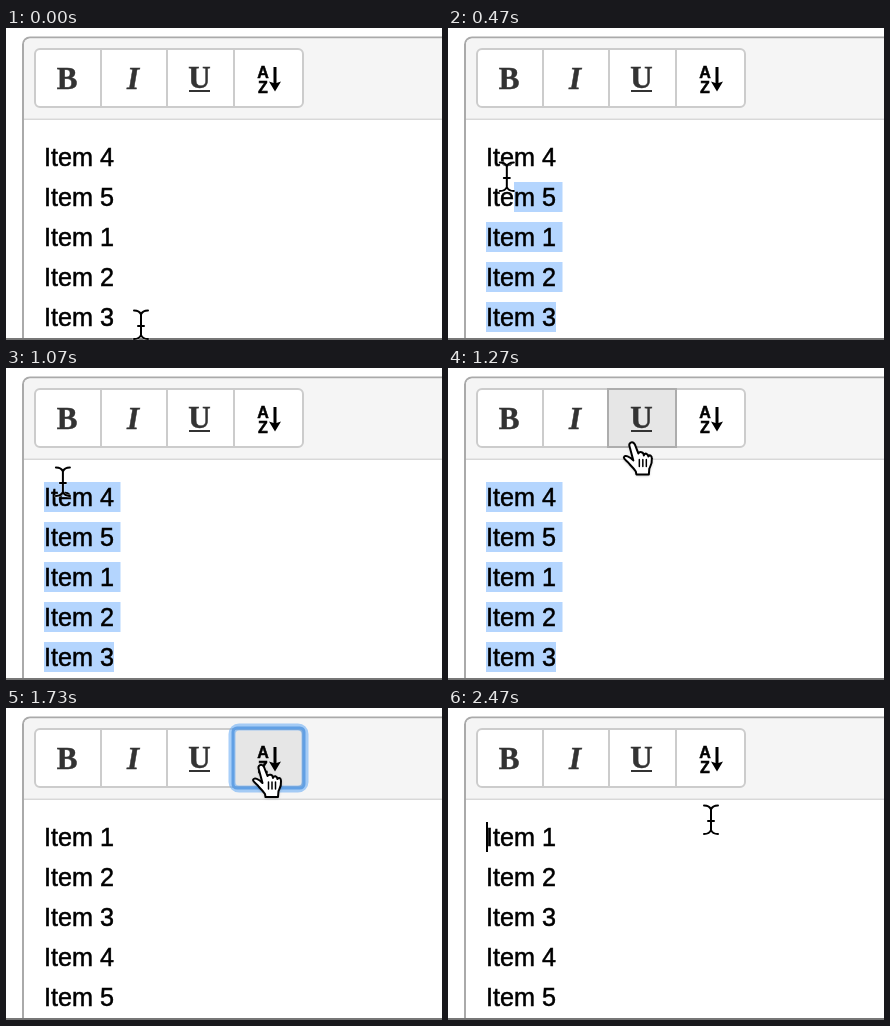
Recreate the animation shown at these times as an HTML page with a canvas. Size 436 px wide and 312 px high, loop 2590 ms.

```html
<!DOCTYPE html>
<html lang="en">
<head>
<meta charset="utf-8">
<style>
html, body { margin: 0; width: 100%; height: 100%; overflow: hidden; background: #fff; }
canvas { display: block; }
</style>
</head>
<body>
<canvas width="436" height="312"></canvas>
<script>
const c = document.querySelector("canvas").getContext("2d");
const LOOP = 2590, STEP = 200 / 3, LEFT = 38, END = 108, TAIL = 114.5;
const CLICK = 1600, SORT = 1730, BLUR = 2465;
const itemFont = '25.2px "Liberation Sans", Arial, sans-serif';
const serif = '31px "Liberation Serif", serif';
const sans = 'bold 16px "Liberation Sans", Arial, sans-serif';
const unsorted = [4, 5, 1, 2, 3], sorted = [...unsorted].sort();
const edges = [29, 95, 161, 228, 297];

// Pointer paths: start time, steps, and three points of a curve
const drag = { start: 270, steps: 7, x: [135, 101, 36], y: [297, 199, 119] };
const reach = { start: 1070, steps: 7, x: [36, 49, 261], y: [119, 116, 64] };
const leave = { start: 2130, steps: 6, x: [261, 262, 263], y: [64, 69, 112] };

const beam = new Path2D("M-7-14.5Q-1.5-14.5 0-10.5Q1.5-14.5 7-14.5M0-10.5V10M-7 14Q-1.5 14 0 10Q1.5 14 7 14M-3 1H3");
const hand = new Path2D("M6 6C4 1 9-1 11 3L14.5 12C15.5 10 20 10 20 14C21 11 24 12 24.5 15C26 13 28 14 28 17C28.5 22 27 24 25.5 27L25 33H12.5L12 30C10 27 8 25 6 23C4 20 0 18 0 16C1 13 6 15 9.5 19Z");
const knuckles = new Path2D("M15.5 18V25M19 18V25M22.5 18V25");
const arrow = new Path2D("M267.5 39H270.5V55L275 53.5L269 63.5L263 53.5L267.5 55Z");

const clamp = (v, lo, hi) => Math.min(hi, Math.max(lo, v));

// The pointer moves in held steps, slowing down along the curve
function along({ start, steps, x, y }, t) {
  const s = clamp(Math.floor((t - start + 5) / STEP) + 1, 0, steps) / steps;
  const u = 1 - (1 - s) ** 2;
  return [x, y].map(([a, b, d]) => a * (1 - u) ** 2 + 2 * b * u * (1 - u) + d * u * u);
}

function rect(x, y, w, h, color) {
  c.fillStyle = color;
  c.fillRect(x, y, w, h);
}

function frame(x, y, w, h, r, color, width, fill) {
  c.beginPath();
  c.roundRect(x, y, w, h, r);
  if (fill) { c.fillStyle = fill; c.fill(); }
  c.strokeStyle = color;
  c.lineWidth = width;
  c.stroke();
}

// A hairline outline gives the heavier smoothing of the letters
function text(s, x, y, font, color = "#000", align = "center") {
  c.font = font;
  c.fillStyle = c.strokeStyle = color;
  c.lineWidth = 0.5;
  c.textAlign = align;
  c.fillText(s, x, y);
  c.strokeText(s, x, y);
}

function stroke(path, color, width) {
  c.strokeStyle = color;
  c.lineWidth = width;
  c.stroke(path);
}

function toolbar(hover, focus, pressed) {
  frame(29, 21, 268, 58, 5, "#ccc", 2, "#fff");
  for (const x of edges.slice(1, 4)) rect(x - 1, 21, 2, 58, "#ccc");
  const lit = focus ? 3 : hover;
  if (lit >= 0) {
    const x = edges[lit] - (lit > 0), w = edges[lit + 1] - x;
    frame(x, 21, w, 58, lit == 3 ? [0, 5, 5, 0] : 0, "#adadad", 2, "#e6e6e6");
    if (pressed) {
      const g = c.createLinearGradient(0, 22, 0, 32);
      g.addColorStop(0, "rgba(0,0,0,.13)");
      g.addColorStop(1, "rgba(0,0,0,0)");
      rect(x + 1, 22, w - 2, 10, g);
    }
  }
  if (focus) {
    frame(226, 19, 73, 62, 7, "rgba(110,175,245,.6)", 7);
    frame(227, 20, 71, 60, 4, "#62a0e4", 3);
  }
  text("B", 61, 61, "bold " + serif, "#333");
  text("I", 127, 61, "italic bold " + serif, "#333");
  text("U", 193.5, 60, "bold " + serif, "#333");
  rect(183, 62, 21, 2, "#333");
  text("A", 257, 49.5, sans);
  text("Z", 257, 64.5, sans);
  c.fill(arrow);
}

function highlight(t) {
  // The selection trails the pointer by one step and snaps to letters
  const [x, y] = along(drag, t - STEP);
  const first = clamp(Math.floor((y - 109) / 40), 0, 4);
  c.font = itemFont;
  const label = "Item " + unsorted[first];
  const stops = [...label, ""].map((_, i) => LEFT + c.measureText(label.slice(0, i)).width);
  const from = stops.reduce((a, b) => Math.abs(b - x) < Math.abs(a - x) ? b : a);
  for (let i = first; i < 5; i++) {
    const left = i == first ? from : LEFT;
    rect(left, 114 + 40 * i, (i == 4 ? END : TAIL) - left, 30, "#b4d5fe");
  }
}

function pointer(x, y, over) {
  c.save();
  c.lineJoin = c.lineCap = "round";
  if (over) {
    c.translate(x - 14, y - 8);
    c.save();
    c.shadowColor = "rgba(0,0,0,.35)";
    c.shadowBlur = 3;
    c.shadowOffsetY = 1;
    c.fillStyle = "#fff";
    c.fill(hand);
    c.restore();
    stroke(hand, "#000", 2);
    stroke(knuckles, "#000", 1.5);
  } else {
    c.translate(x, y);
    stroke(beam, "rgba(255,255,255,.5)", 3);
    stroke(beam, "#000", 2);
  }
  c.restore();
}

function draw(now) {
  const t = now % LOOP;
  const leg = t < reach.start - 5 ? drag : t < leave.start - 5 ? reach : leave;
  const [x, y] = along(leg, t);
  const over = y < 82;
  const hover = over ? edges.findLastIndex(e => e <= x) : -1;

  rect(0, 0, 436, 312, "#fff");
  frame(17, 9.5, 500, 400, 7, "#aaa", 2, "#fff");
  c.save();
  c.beginPath();
  c.roundRect(18, 10.5, 500, 400, 6);
  c.clip();
  rect(18, 10, 418, 80.5, "#f5f5f5");
  rect(18, 90.5, 418, 1.5, "#d8d8d8");
  c.restore();
  toolbar(hover, t >= CLICK && t < BLUR, t >= CLICK && t < SORT);

  if (t < SORT) highlight(t);
  (t < SORT ? unsorted : sorted).forEach((n, i) =>
    text("Item " + n, LEFT, 138 + 40 * i, itemFont, "#000", "left"));
  if (t >= 130 && t < drag.start + STEP) rect(END, 274, 2, 30, "#000");
  if (t >= BLUR) rect(LEFT, 114, 2, 30, "#000");

  rect(0, 310, 436, 2, "#777");
  pointer(x, y, over);
  requestAnimationFrame(draw);
}
requestAnimationFrame(draw);
</script>
</body>
</html>
```
